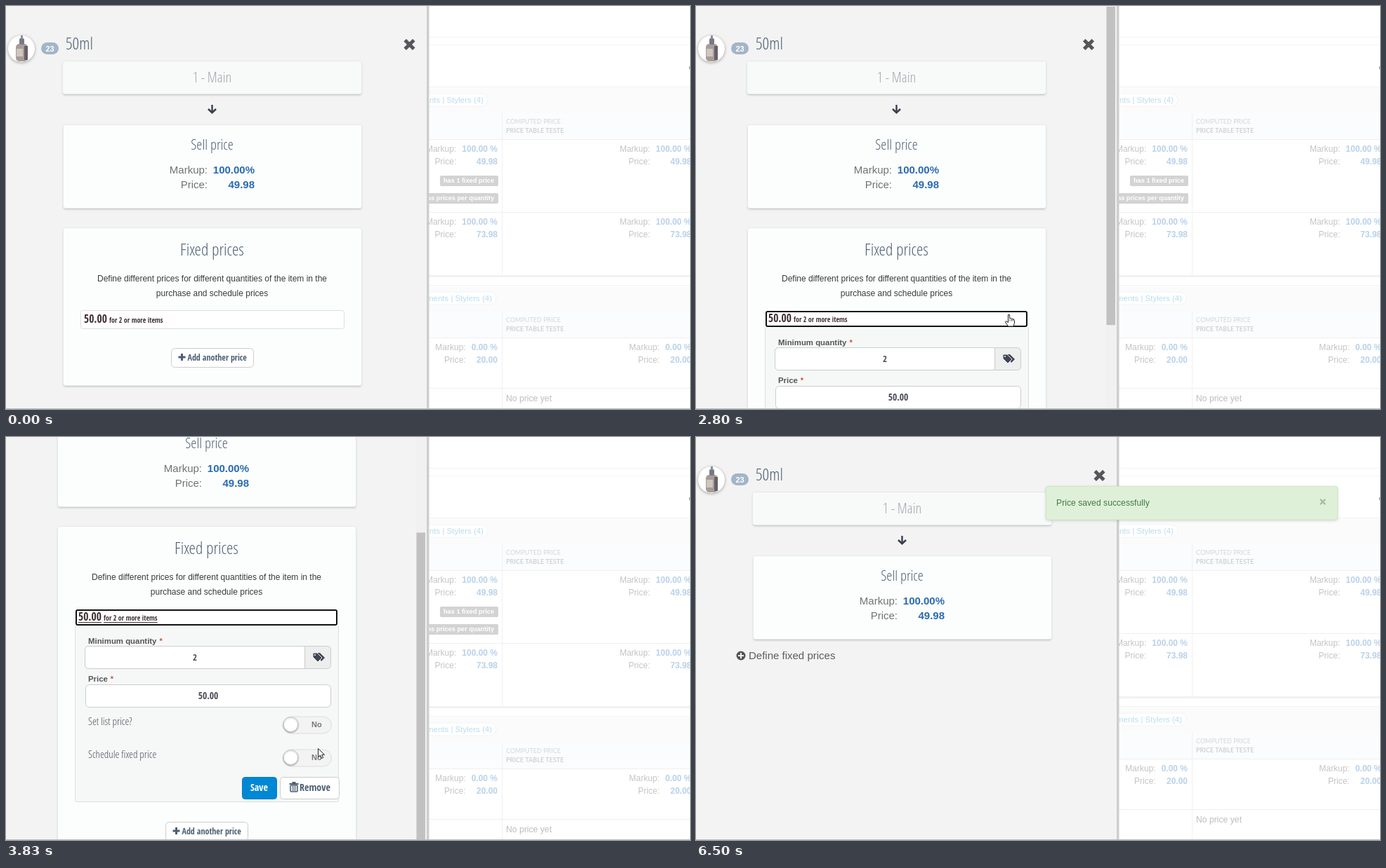
An HTML page with a canvas for the animation above (7.04 s loop, 974 px wide and 575 px high).

```html
<!DOCTYPE html>
<html lang="en">
<head>
<meta charset="utf-8">
<title>Fixed prices</title>
<style>
  html, body { margin: 0; width: 100%; height: 100%; overflow: hidden; background: #fff; }
  canvas { display: block; }
</style>
</head>
<body>
<canvas id="stage" width="974" height="575"></canvas>
<script>
const ctx = document.getElementById('stage').getContext('2d');
const LOOP = 7040, FORM_HEIGHT = 250, VIEW = 634;
const OPEN = 2410, COLLAPSE = 4420, REMOVED = 4640, TABLE_UPDATE = 5480;
const SLATE = '#4c5f73';

const sans = (size, weight = '') => `${weight} ${size}px "Liberation Sans", Arial, sans-serif`;
const narrow = size => `300 condensed ${size}px "Open Sans Condensed Light", "Open Sans", sans-serif`;
const narrowBold = size => `bold condensed ${size}px "Open Sans Condensed", "Open Sans", sans-serif`;
const lato = weight => `${weight} 9px Lato, sans-serif`;

const clamp = v => Math.max(0, Math.min(1, v));
const ease = (t, from, to) => {
  const p = clamp((t - from) / (to - from));
  return p * p * (3 - 2 * p);
};

function text(str, x, y, font, color, align = 'left') {
  ctx.font = font;
  ctx.fillStyle = color;
  ctx.textAlign = align;
  ctx.fillText(str, x, y);
  return ctx.measureText(str).width;
}

function rect(x, y, w, h, color) {
  ctx.fillStyle = color;
  ctx.fillRect(x, y, w, h);
}

function box(x, y, w, h, radius, fill, border, lineWidth = 1) {
  ctx.beginPath();
  ctx.roundRect(x, y, w, h, radius);
  ctx.fillStyle = fill;
  ctx.fill();
  if (!border) return;
  ctx.strokeStyle = border;
  ctx.lineWidth = lineWidth;
  ctx.stroke();
}

function circle(x, y, r, fill, border) {
  box(x - r, y - r, 2 * r, 2 * r, r, fill, border);
}

function line(points, color, width) {
  ctx.beginPath();
  points.forEach(([x, y]) => ctx.lineTo(x, y));
  ctx.strokeStyle = color;
  ctx.lineWidth = width;
  ctx.stroke();
}

function shape(points, fill, border) {
  ctx.beginPath();
  points.forEach(([x, y]) => ctx.lineTo(x, y));
  ctx.closePath();
  ctx.fillStyle = fill;
  ctx.fill();
  if (!border) return;
  ctx.strokeStyle = border;
  ctx.lineWidth = 1;
  ctx.stroke();
}

function shadowed(blur, offset, color, draw) {
  ctx.save();
  ctx.shadowBlur = blur;
  ctx.shadowOffsetY = offset;
  ctx.shadowColor = color;
  draw();
  ctx.restore();
}

function cross(x, y, r, color, width) {
  line([[x - r, y - r], [x + r, y + r]], color, width);
  line([[x + r, y - r], [x - r, y + r]], color, width);
}

function plus(x, y, r, color, width) {
  line([[x - r, y], [x + r, y]], color, width);
  line([[x, y - r], [x, y + r]], color, width);
}

// Faded price table behind the panel
function tableValues(y, markup, price) {
  for (const right of [700, 976]) {
    const width = text(markup, right, y, sans(12, 'bold'), '#b9d2ea', 'right');
    text(price, right, y + 17.5, sans(12, 'bold'), '#b9d2ea', 'right');
    text('Markup:', right - width - 8, y, sans(12), '#c4c4c4', 'right');
    text('Price:', right - width - 8, y + 17.5, sans(12), '#c4c4c4', 'right');
  }
}

function tableHead(y, label, right) {
  rect(600, y, 374, 1, '#f3f3f3');
  rect(600, y + 1, 374, 37, '#fbfbfb');
  box(560, y + 10, right + 6 - 560, 18, 9, '#fff', '#f1f4f6');
  text(label, right, y + 23, sans(11.5), '#b9dcee', 'right');
  rect(600, y + 38, 374, 37, '#fafcfe');
  rect(600, y + 75, 374, 1, '#efefef');
  text('COMPUTED PRICE', 712, y + 53, lato('normal'), '#d6d6d6');
  text('PRICE TABLE TESTE', 712, y + 66, lato('bold'), '#d2d2d2');
}

function badge(label, y) {
  ctx.font = sans(9.2, 'bold');
  const width = ctx.measureText(label).width + 11;
  box(701 - width, y, width, 15, 2, '#d3d3d3');
  text(label, 695, y + 10, sans(9.2, 'bold'), '#fff', 'right');
}

function drawTable(updated) {
  const shift = updated ? -14 : 0;
  rect(0, 0, 974, 575, '#fff');
  rect(600, 44, 374, 1, '#f3f3f3');
  rect(600, 55, 374, 1, '#f6f6f6');
  circle(978.2, 88, 5, '#555');
  tableHead(115, 'Treatments | Stylers (4)', 680);
  tableValues(208, '100.00 %', '49.98');
  if (!updated) {
    badge('has 1 fixed price', 242);
    badge('has prices per quantity', 267);
  }
  ctx.save();
  ctx.translate(0, shift);
  rect(600, 294, 374, 1, '#efefef');
  tableValues(312, '100.00 %', '73.98');
  rect(600, 384, 374, 3, '#f1f1f1');
  tableHead(398, 'Treatments | Stylers (4)', 692);
  tableValues(491, '0.00 %', '20.00');
  rect(600, 545, 374, 1, '#efefef');
  text('No price yet', 712, 564, sans(12.2), '#bdbdbd');
  ctx.restore();
  rect(706, 153, 1, 231 + shift, '#f0f0f0');
  rect(706, 436 + shift, 1, 139 - shift, '#f0f0f0');
}

// Sliding panel
function card(x, y, w, h, fill) {
  shadowed(3, 2, 'rgba(80,90,95,.35)', () => box(x, y, w, h, 3, fill));
  box(x - 0.5, y - 0.5, w + 1, h + 1, 3, fill, '#e6e9e9');
}

function drawHeader(closeX) {
  shadowed(4, 1, 'rgba(0,0,0,.35)', () => circle(22, 61, 19, '#fff'));
  box(14, 54, 17, 25, 5, '#a89c98');
  box(19, 46, 7, 9, 2, '#777a86');
  rect(21, 42, 3, 5, '#8b8d96');
  rect(15, 61, 9, 11, '#d0c6c0');
  rect(26, 57, 5, 20, '#65606a');
  box(50, 52, 25, 17, 8.5, '#a3b5c8');
  text('23', 62.5, 65, sans(11, 'bold'), '#fff', 'center');
  text('50ml', 85, 62, narrow(24), SLATE);
  cross(closeX, 55, 6.3, '#555659', 5);
}

function drawSellPrice() {
  card(81, 79, 425, 46, '#f8f9f9');
  text('1 - Main', 293.5, 109, narrow(20.5), '#a2a5ab', 'center');
  line([[293.5, 141], [293.5, 152]], '#3a3e4c', 2.4);
  line([[288, 147], [293.5, 152.3], [299, 147]], '#3a3e4c', 2.6);
  card(82, 170, 424, 118, '#fcfefd');
  text('Sell price', 293.5, 205, narrow(20.5), SLATE, 'center');
  [['Markup:', '100.00%', 239], ['Price:', '49.98', 260]].forEach(([label, value, y]) => {
    text(label, 287, y, sans(15), '#717171', 'right');
    text(value, 354, y, sans(15, 'bold'), '#2b6bb0', 'right');
  });
}

function field(label, y) {
  const width = text(label, 125, y, sans(11.4, 'bold'), '#555');
  text('*', 125 + width + 4, y, sans(11, 'bold'), '#c0563f');
}

function toggle(label, y) {
  text(label, 125, y, narrow(15), '#4b5058');
  box(402.5, y - 12, 69, 24, 12, '#f3f3f3', '#dcdcdc');
  shadowed(2, 1, 'rgba(0,0,0,.3)', () => circle(413.5, y - 1, 10.5, '#fff', '#ccc'));
  text('No', 443, y + 3, sans(11, 'bold'), '#777');
}

function drawTags() {
  shape([[450, 497], [455, 497], [462, 504], [457, 509]], '#3f4552');
  shape([[445, 497], [451, 497], [458, 504], [452, 510], [445, 503]], '#3f4552', '#eee');
  circle(448, 500, 1.1, '#eee');
}

function drawTrash() {
  rect(411.5, 683, 13, 2, SLATE);
  rect(415.5, 681, 5, 2, SLATE);
  box(413, 686, 10, 9, 1, '#fff', SLATE, 1.6);
  [415.5, 417.6, 419.7].forEach(x => rect(x, 687, 1, 7, SLATE));
}

function drawForm(height) {
  ctx.save();
  ctx.beginPath();
  ctx.rect(100, 458, 390, height + 3);
  ctx.clip();
  box(106.5, 455.5, 375, height + 4, 2, '#f6f7f7', '#dedede');
  field('Minimum quantity', 484);
  box(120.5, 487.5, 350, 32, 5, '#eee', '#ccc');
  box(120.5, 487.5, 313, 32, [5, 0, 0, 5], '#fff', '#ccc');
  text('2', 277, 508, narrowBold(13), '#4c4f57', 'center');
  drawTags();
  field('Price', 538);
  box(121.5, 542.5, 349, 32, 5, '#fff', '#ccc');
  text('50.00', 296, 563, narrowBold(13.5), '#4c4f57', 'center');
  toggle('Set list price?', 600);
  toggle('Schedule fixed price', 647);
  box(344.5, 674.5, 49, 31, 4, '#0088d4', '#067cc2');
  text('Save', 368.5, 694, narrowBold(14), '#fff', 'center');
  box(398.5, 674.5, 84, 31, 4, '#fff', '#ccc');
  drawTrash();
  text('Remove', 426, 694, narrowBold(14), SLATE);
  ctx.restore();
}

function drawFixedPrices(height, focused, underlined) {
  card(82, 317, 424, 224 + height, '#fcfefd');
  text('Fixed prices', 293.5, 356, narrow(24), SLATE, 'center');
  text('Define different prices for different quantities of the item in the',
    293.5, 393, sans(12), '#3a3a3a', 'center');
  text('purchase and schedule prices', 293.5, 414, sans(12), '#3a3a3a', 'center');
  if (height) drawForm(height);
  if (focused) box(108, 436, 371, 21, 2, '#fff', '#111', 2);
  else box(106.5, 434.5, 375, 26, 3, '#fff', '#ddd');
  const y = focused ? 451 : 452, ink = '#3f3032';
  const price = text('50.00', 111, y, narrowBold(15.5), ink);
  const note = text('for 2 or more items', 147, y, narrowBold(10), ink);
  if (underlined) {
    rect(111, y + 2, price, 1, ink);
    rect(147, y + 2, note, 1, ink);
  }
  const top = 488.5 + height;
  box(235.5, top, 117, 27, 5, '#fff', '#ccc');
  plus(250.5, top + 12.5, 5, SLATE, 3);
  text('Add another price', 258.5, top + 17, narrowBold(12), SLATE);
}

function drawDefineLink() {
  circle(64, 312, 6.5, '#555');
  plus(64, 312, 4, '#f3f3f3', 2);
  text('Define fixed prices', 75, 317, sans(15), '#5c5c5c');
}

function drawPanel(t) {
  const height = FORM_HEIGHT * (ease(t, OPEN, 2800) - ease(t, COLLAPSE, REMOVED));
  const removed = t >= REMOVED, expanded = t >= OPEN && !removed;
  const wanted = 189 * ease(t, 3270, 3830) + 26 * ease(t, 4070, 4350);
  const scroll = expanded ? Math.round(Math.min(wanted, height)) : 0;

  rect(0, 0, 599, 575, '#f3f3f3');
  ctx.save();
  ctx.translate(0, -scroll);
  drawHeader(expanded ? 559 : 574.5);
  ctx.translate(expanded ? -8 : 0, 0);
  drawSellPrice();
  if (removed) drawDefineLink();
  else drawFixedPrices(height, expanded, expanded && t >= 3270);
  ctx.restore();

  if (expanded) {
    const ratio = VIEW / (VIEW + 1 + height);
    rect(584, 0, 14, 575, '#f1f1f1');
    rect(584.5, 1 + scroll * ratio, 12.5, VIEW * ratio, '#c1c1c1');
  }
  rect(599, 0, 3.5, 575, '#cecece');
}

function drawToast(t) {
  ctx.globalAlpha = ease(t, 5200, 5500);
  shadowed(4, 1, 'rgba(0,0,0,.2)', () => box(498.5, 70.5, 415, 47.5, 3, '#dff0d8'));
  box(498.5, 70.5, 415, 47.5, 3, '#dff0d8', '#d2e7c4');
  text('Price saved successfully', 513, 98, sans(12.2), '#437a45');
  cross(892.5, 92.5, 3.6, '#a9bba4', 2.2);
  ctx.globalAlpha = 1;
}

// Pointer path: time, x, y
const path = [
  [910, 953, 463], [1130, 690, 456], [1380, 485, 428], [1530, 451, 432], [1620, 451, 432],
  [1930, 445, 440], [3270, 445, 440], [3300, 444, 444], [4070, 444, 444], [4350, 448, 470],
  [4930, 448, 470], [5010, 484, 470], [5179, 484, 470], [5180, 491, 473], [5790, 501, 419],
  [6020, 501, 419], [6430, 918, 549], [6500, 985, 575]
];
const ARROW = [[0, 0], [0, 12], [3, 9.5], [5.2, 14], [7.2, 13], [5.2, 8.8], [9, 8.8]];
const HAND = [[-1, 0], [1, 0], [1.2, 5], [3, 5], [5, 6], [7, 6.5], [8, 8], [8, 12], [6.5, 16.5],
  [-1, 16.5], [-5, 10.5], [-4, 9], [-1, 11]];

function drawPointer(t) {
  const next = path.findIndex(p => p[0] > t);
  if (next < 1) return;
  const [t0, x0, y0] = path[next - 1], [t1, x1, y1] = path[next];
  const p = (t - t0) / (t1 - t0);
  const hand = (t >= 1700 && t < 3270) || (t >= 4280 && t < REMOVED);
  ctx.save();
  ctx.translate(x0 + (x1 - x0) * p + 0.5, y0 + (y1 - y0) * p + 0.5);
  ctx.lineJoin = 'round';
  shape(hand ? HAND : ARROW, '#fff', '#222');
  if (hand) [1.5, 4, 6].forEach(x => line([[x, 6], [x, 9]], '#222', 0.8));
  ctx.restore();
}

function render(now) {
  const t = now % LOOP;
  drawTable(t >= TABLE_UPDATE);
  drawPanel(t);
  if (t >= 5200) drawToast(t);
  rect(0, 574, 974, 1, '#bdbdbd');
  drawPointer(t);
}

const start = performance.now();
function tick() {
  render(performance.now() - start);
  requestAnimationFrame(tick);
}
tick();
</script>
</body>
</html>
```
